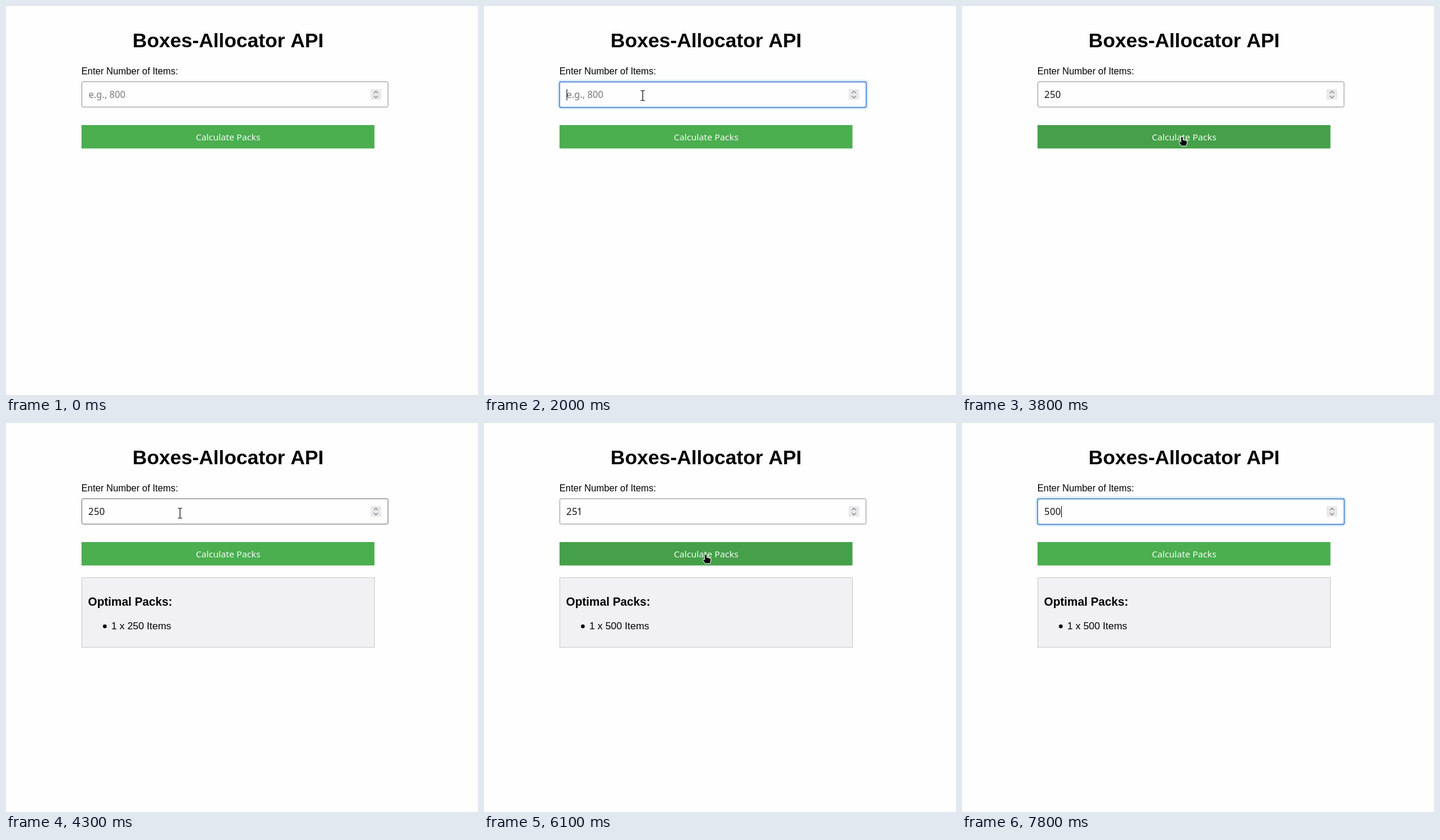
These frames come from a looping animation (800 px wide and 660 px high, 8 s). An HTML page with a canvas:

```html
<!DOCTYPE html>
<html lang="en">
<head>
<meta charset="utf-8">
<title>Boxes-Allocator API</title>
<style>
  html, body { margin: 0; width: 100%; height: 100%; overflow: hidden; background: #fefefe; }
  canvas { display: block; }
</style>
</head>
<body>
<canvas id="stage" width="800" height="660"></canvas>
<script>
const ctx = document.getElementById('stage').getContext('2d');
const LOOP = 8000, STEP = 100;
const SANS = '"Liberation Sans", Arial, sans-serif';
const UI = '"Noto Sans", "Open Sans", sans-serif';

// [start, value]: each value holds until the next start
const typed = [[0, ''], [2400, '2'], [2600, '25'], [2800, '250'], [4900, '25'], [5100, '251'],
  [7000, '25'], [7100, '2'], [7200, ''], [7400, '5'], [7600, '50'], [7800, '500']];
const result = [[0, ''], [3900, '250'], [6100, '500']];
const focus = [[0, false], [1800, true], [3800, false], [4500, true], [5900, false], [6600, true]];
const caret = [[0, false], [1800, true], [3000, false], [4500, true], [5600, false], [6800, true]];

// The pointer hides while typing
const moves = [
  { end: 2400, keys: [[1300, 290, 184], [1500, 264, 136], [1700, 267, 149], [2000, 269, 152]] },
  { end: 4900, keys: [[3300, 270, 154], [3700, 372, 222], [4100, 374, 224], [4300, 295, 153]] },
  { end: 7000, keys: [[5500, 300, 158], [5700, 376, 224], [6200, 376, 224], [6300, 354, 194],
    [6400, 344, 158], [6600, 342, 152]] }
];

const at = (track, t) => track.filter(k => k[0] <= t).pop()[1];

function pointerAt(t) {
  const move = moves.find(m => t >= m.keys[0][0] && t < m.end);
  if (!move) return null;
  const i = move.keys.findIndex(k => k[0] > t);
  if (i < 0) {
    const [, x, y] = move.keys[move.keys.length - 1];
    return { x, y };
  }
  const [t0, x0, y0] = move.keys[i - 1], [t1, x1, y1] = move.keys[i];
  const p = (t - t0) / (t1 - t0);
  return { x: Math.round(x0 + (x1 - x0) * p), y: Math.round(y0 + (y1 - y0) * p) };
}

const inside = (p, x, y, w, h) => p && p.x >= x && p.x < x + w && p.y >= y && p.y < y + h;

function text(str, x, y, font, color = '#000', align = 'left') {
  ctx.font = font;
  ctx.fillStyle = color;
  ctx.textAlign = align;
  ctx.fillText(str, x, y);
}

function fill(x, y, w, h, color) {
  ctx.fillStyle = color;
  ctx.fillRect(x, y, w, h);
}

function frame(x, y, w, h, r, color, width) {
  ctx.beginPath();
  ctx.roundRect(x, y, w, h, r);
  ctx.strokeStyle = color;
  ctx.lineWidth = width;
  ctx.stroke();
}

function line(points, color, width) {
  ctx.beginPath();
  points.forEach(([x, y]) => ctx.lineTo(x, y));
  ctx.strokeStyle = color;
  ctx.lineWidth = width;
  ctx.stroke();
}

function drawValue(value, showCaret) {
  const font = '16px ' + UI;
  let x = 139.5;
  for (const ch of value) {
    text(ch, ch === '1' ? x - 0.8 : x, 156, font, '#111');
    x += ch === '1' ? 5.8 : 9.4;
  }
  if (showCaret) fill(value ? Math.floor(x + 0.5) : 140, 141, 1, 19, '#000');
}

function drawInput(t, hover) {
  const value = at(typed, t);
  ctx.fillStyle = '#fefefe';
  ctx.beginPath();
  ctx.roundRect(128, 128, 520, 44, 3);
  ctx.fill();
  if (at(focus, t)) {
    frame(126.5, 127, 523, 46.5, 4.5, '#d6e8fa', 3.5);
    frame(128.2, 128.7, 519.5, 43.2, 2.5, '#3a7ccb', 1.5);
  } else {
    frame(128.5, 128.5, 519, 43, 2.5, hover ? '#676774' : '#8f8f9d', 1);
  }
  if (!value) text('e.g., 800', 140, 156, '15.7px ' + UI, '#777');
  drawValue(value, at(caret, t));

  fill(618, 141, 18, 18, '#e9e8eb');
  line([[623.5, 148], [627, 144.5], [630.5, 148]], '#858589', 1.3);
  line([[623.5, 152.5], [627, 156], [630.5, 152.5]], '#858589', 1.3);
}

function drawResult(count) {
  if (!count) return;
  fill(128, 262, 497, 119, '#f1f0f2');
  frame(128.5, 262.5, 496, 118, 0, '#c9c9cc', 1);
  text('Optimal Packs:', 139, 310, 'bold 19.8px ' + SANS);
  ctx.beginPath();
  ctx.arc(167.5, 345, 3.2, 0, Math.PI * 2);
  ctx.fill();
  text(`1 x ${count} Items`, 178.5, 350, '16.9px ' + SANS);
}

function drawShape(path, x, y) {
  ctx.save();
  ctx.translate(x, y);
  const shape = new Path2D(path);
  ctx.lineJoin = 'round';
  ctx.lineWidth = 2;
  ctx.strokeStyle = '#fff';
  ctx.stroke(shape);
  ctx.fillStyle = '#000';
  ctx.fill(shape);
  ctx.restore();
}

const ARROW = 'M0 0V14L3.3 11L5.6 16L7.7 15L5.4 10.2H10Z';
const HAND = 'M-1.5 0Q0 -1.5 1.2 0V5L2.5 4.5L4 5.5L5.5 5L6.5 6.2L8 6V10L6.5 14H-1L-4.5 9Q-4.5 7 -3 7.5L-1.5 9Z';
const BEAM = 'M-3.5 -9H-1L0 -8.3L1 -9H3.5V-8H1.2L.6 -7.4V7.4L1.2 8H3.5V9H1L0 8.3L-1 9H-3.5V8H-1.2L-.6 7.4V-7.4L-1.2 -8H-3.5Z';

function draw(t) {
  const p = pointerAt(t);
  const overInput = inside(p, 128, 128, 520, 44);
  const overButton = inside(p, 128, 202, 496, 40);

  fill(0, 0, 800, 660, '#fefefe');
  text('Boxes-Allocator API', 376.5, 70, 'bold 33.7px ' + SANS, '#000', 'center');
  text('Enter Number of Items:', 127.8, 115.5, '15.85px ' + SANS);
  drawInput(t, overInput);
  fill(128, 202, 496.5, 39.7, overButton ? '#45a049' : '#4bae4f');
  text('Calculate Packs', 376.4, 228, '15.2px ' + UI, '#f4fbf4', 'center');
  drawResult(at(result, t));
  if (p) drawShape(overInput ? BEAM : overButton ? HAND : ARROW, p.x, p.y);
}

function tick(now) {
  draw(Math.floor((now % LOOP) / STEP) * STEP);
  requestAnimationFrame(tick);
}
draw(0);
requestAnimationFrame(tick);
</script>
</body>
</html>
```
